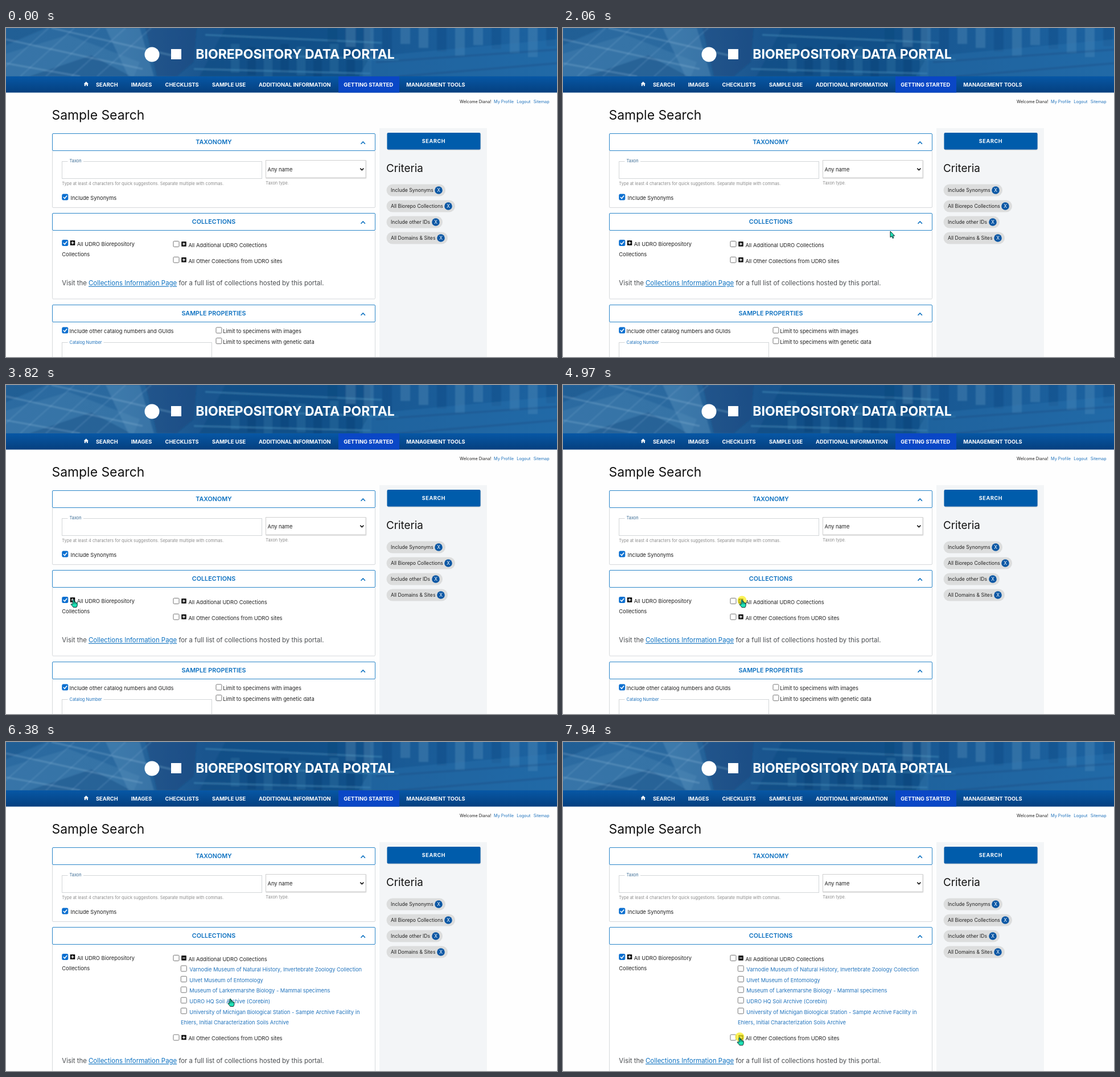
These frames come from a looping animation (968x578 px, 8000 ms). An HTML page:

```html
<!DOCTYPE html>
<html lang="en">
<head>
<meta charset="utf-8">
<title>Sample Search</title>
<style>
  html, body { margin: 0; width: 100%; height: 100%; overflow: hidden; background: #fefefe; }
  svg { display: block; width: 968px; height: 578px; font-family: Inter, "Open Sans", sans-serif; }
</style>
</head>
<body>
<svg id="stage" viewBox="0 0 968 578">
  <defs>
    <linearGradient id="photo">
      <stop offset="0" stop-color="#2c6ba1"/>
      <stop offset=".2" stop-color="#2a699f"/>
      <stop offset=".36" stop-color="#1a558e"/>
      <stop offset=".6" stop-color="#185791"/>
      <stop offset="1" stop-color="#1c62a0"/>
    </linearGradient>
    <linearGradient id="bar" x2="0" y2="1">
      <stop offset="0" stop-color="#0757a5"/>
      <stop offset="1" stop-color="#05407f"/>
    </linearGradient>
    <filter id="soft" x="-5%" y="-20%" width="110%" height="140%"><feGaussianBlur stdDeviation="1.1"/></filter>
    <filter id="drop" x="-10%" y="-20%" width="120%" height="160%">
      <feDropShadow dx=".4" dy=".8" stdDeviation=".7" flood-opacity=".25"/>
    </filter>
    <clipPath id="top"><rect width="968" height="85"/></clipPath>
  </defs>
</svg>
<script>
const NS = 'http://www.w3.org/2000/svg';
const stage = document.getElementById('stage');
const BLUE = '#0b70c0', LINK = '#2274bd', INK = '#222', GREY = '#d6d9dc';

function add(parent, tag, attrs = {}, content) {
  const el = document.createElementNS(NS, tag);
  for (const k in attrs) el.setAttribute(k, attrs[k]);
  if (content) el.textContent = content;
  parent.appendChild(el);
  return el;
}
const group = (parent = stage, attrs) => add(parent, 'g', attrs);
const text = (p, x, y, s, size = 9.3, fill = INK, more = {}) =>
  add(p, 'text', { x, y, 'font-size': size, fill, ...more }, s);
const rect = (p, x, y, width, height, fill, more = {}) =>
  add(p, 'rect', { x, y, width, height, fill, ...more });
const line = (p, d, stroke, width = 1, more = {}) =>
  add(p, 'path', { d, stroke, 'stroke-width': width, fill: 'none', ...more });
const shape = (p, d, fill, opacity = 1) => add(p, 'path', { d, fill, opacity });

function checkbox(p, cx, cy, on) {
  rect(p, cx - 5, cy - 5, 10, 10, on ? '#0b6fd0' : '#fff',
    { rx: 1.5, stroke: on ? '#0b6fd0' : '#767676' });
  if (on) line(p, `M${cx - 3} ${cy}l2.3 2.5 4-5`, '#fff', 1.6);
}
function plus(p, cx, cy) {
  rect(p, cx - 4.25, cy - 4.25, 8.5, 8.5, '#000', { rx: .6 });
  line(p, `M${cx - 2.6} ${cy}h5.2`, '#fff', 1.4);
  return line(p, `M${cx} ${cy - 2.6}v5.2`, '#fff', 1.4);
}
function heading(p, y, label) {
  const box = rect(p, 81.5, y + .5, 567, 30, '#fff', { rx: 1.5, stroke: '#2b86c9' });
  text(p, 365, y + 19.4, label, 10.75, BLUE, { 'font-weight': 600, 'text-anchor': 'middle' });
  line(p, `M623.5 ${y + 18.7}l3.7-3.7 3.7 3.7`, BLUE, 1.6);
  return box;
}
const card = (p, y, h) => rect(p, 81.5, y + .5, 567, h, '#fff', { rx: 1.5, stroke: GREY });

function banner() {
  const g = group(stage, { 'clip-path': 'url(#top)' });
  rect(g, 0, 0, 968, 85, 'url(#photo)');
  const s = group(g, { filter: 'url(#soft)' });
  shape(s, 'M0 0H70L0 30Z', '#1b538a', .5);
  shape(s, 'M0 45L110 12L235 60L225 85H0Z', '#5590bd', .25);
  shape(s, 'M40 85L150 48L220 85Z', '#1a5289', .5);
  shape(s, 'M175 0H235L260 85H215Z', '#6aa0c8', .3);
  shape(s, 'M245 0H335L330 60L300 85H265Z', '#123f72', .35);
  for (let i = 0; i < 5; i++)
    line(s, `M${i * 45 - 20} 85L${i * 45 + 75} 0`, '#8fbbda', 2, { opacity: .2 });
  line(s, 'M0 20L240 72M0 62L130 85M80 0L300 50', '#9cc4df', 3, { opacity: .25 });
  shape(s, 'M385 0H640V85H340Z', '#0f4278', .3);
  for (let i = 0; i < 9; i++)
    rect(s, 395 + i * 29, 28 + i % 3 * 5, 15, 50, i % 2 ? '#0b3567' : '#3d82b4', { opacity: .25 });
  line(s, 'M350 12L660 26M340 44L690 56M330 72L640 80', '#57a3cc', 3, { opacity: .35 });
  for (let i = 0; i < 13; i++)
    rect(s, 565 + i * 32, -4, 17, 30 + i * 7 % 26, i % 3 ? '#7fb0d2' : '#0d3c70', { opacity: .22 });
  shape(s, 'M640 50L968 20V85H620Z', '#2f7cb5', .3);
  line(s, 'M650 60L968 38M690 85L968 62', '#0f4278', 4, { opacity: .25 });

  add(g, 'circle', { cx: 256.5, cy: 46.5, r: 13, fill: '#fff' });
  rect(g, 290, 37, 18, 18, '#fff');
  text(g, 333.3, 53.8, 'BIOREPOSITORY DATA PORTAL', 23, '#fff', { 'font-weight': 700 });
}

function nav() {
  rect(stage, 0, 85, 968, 28.5, 'url(#bar)');
  rect(stage, 584, 85, 107, 28.5, '#0a47c6');
  shape(stage, 'M140.8 94.3L145 98.3H143.8V102H141.8V99.5H139.8V102H137.8V98.3H136.6Z', '#fff');
  const items = [[158, 'SEARCH'], [219.7, 'IMAGES'], [279.5, 'CHECKLISTS'], [362, 'SAMPLE USE'],
    [444, 'ADDITIONAL INFORMATION'], [593.3, 'GETTING STARTED'], [703.3, 'MANAGEMENT TOOLS']];
  for (const [x, s] of items) text(stage, x, 103, s, 9.3, '#fff', { 'font-weight': 700 });
  text(stage, 797, 132.2, 'Welcome Diana!', 7.25);
  for (const [x, s] of [[857, 'My Profile'], [897.3, 'Logout'], [926.7, 'Sitemap']])
    text(stage, x, 132.2, s, 7.3, LINK);
}

function sidebar() {
  rect(stage, 656, 176, 189, 402, '#f3f5f7');
  rect(stage, 669.5, 184, 164, 29.5, '#005cab', { rx: 2, filter: 'url(#drop)' });
  text(stage, 751.5, 202.2, 'SEARCH', 9, '#fff',
    { 'font-weight': 700, 'letter-spacing': .7, 'text-anchor': 'middle' });
  text(stage, 668, 253, 'Criteria', 18.8, '#111');
  const chips = [[772, 'Include Synonyms'], [789, 'All Biorepo Collections'],
    [767, 'Include other IDs'], [776, 'All Domains & Sites']];
  chips.forEach(([end, s], i) => {
    const y = 285 + i * 28;
    rect(stage, 668.5, y - 10.5, end - 668.5, 21, '#dcdddd', { rx: 10.5 });
    text(stage, 676, y + 3.3, s, 8.65);
    add(stage, 'circle', { cx: end - 12, cy: y, r: 6.8, fill: '#0b57a4' });
    text(stage, end - 12, y + 3.1, 'X', 8.4, '#fff', { 'text-anchor': 'middle' });
  });
}

function taxonomy() {
  text(stage, 80.5, 161.3, 'Sample Search', 22.9, '#111');
  card(stage, 215, 100);
  heading(stage, 185, 'TAXONOMY');
  rect(stage, 98.5, 234.5, 351, 30, '#fff', { stroke: '#d3d6d8' });
  rect(stage, 108.5, 232, 27.5, 5, '#fff');
  text(stage, 111.5, 236, 'Taxon', 7.4, '#3a6b94');
  text(stage, 98.3, 276.4, 'Type at least 4 characters for quick suggestions. Separate multiple with commas.', 7.4, '#8c8c8c');
  rect(stage, 456.5, 232.5, 175.5, 30.5, '#fff', { stroke: '#cfcfcf', filter: 'url(#drop)' });
  text(stage, 459.5, 251.8, 'Any name', 9.3);
  line(stage, 'M622.3 246.6l3 3 3-3', '#111', 1.6);
  text(stage, 456.3, 275, 'Taxon type.', 7.35, '#8c8c8c');
  checkbox(stage, 103.8, 297, true);
  text(stage, 113.6, 302.2, 'Include Synonyms');
}

banner();
nav();
sidebar();
taxonomy();

const body = card(stage, 355, 120.5);
const bar = heading(stage, 325, 'COLLECTIONS');
checkbox(stage, 103.8, 377.5, true);
plus(stage, 117, 377.5);
text(stage, 124.7, 382.8, 'All UDRO Biorepository');
text(stage, 98.3, 401.4, 'Collections');
checkbox(stage, 299, 379.5);
const upright = plus(stage, 312.5, 379.5);
text(stage, 320.4, 384.6, 'All Additional UDRO Collections');

const list = group();
['Varnodie Museum of Natural History, Invertebrate Zoology Collection',
 'Ulvet Museum of Entomology',
 'Museum of Larkenmarshe Biology - Mammal specimens',
 'UDRO HQ Soil Archive (Corebin)',
 'University of Michigan Biological Station - Sample Archive Facility in'
].forEach((s, i) => {
  checkbox(list, 312.3, 398 + i * 18.6);
  text(list, 322.3, 403.2 + i * 18.6, s, 9.3, LINK);
});
text(list, 307, 496.3, 'Ehlers, Initial Characterization Soils Archive', 9.3, LINK);

const lower = group();
checkbox(lower, 299, 407.3);
plus(lower, 312.5, 407.3);
text(lower, 320.4, 412.6, 'All Other Collections from UDRO sites');
const visit = text(lower, 98.3, 452.4, '', 11.42, '#4a4d50');
add(visit, 'tspan', {}, 'Visit the ');
add(visit, 'tspan', { fill: BLUE, 'text-decoration': 'underline' }, 'Collections Information Page');
add(visit, 'tspan', {}, ' for a full list of collections hosted by this portal.');
card(lower, 516, 120);
heading(lower, 486, 'SAMPLE PROPERTIES');
checkbox(lower, 103.8, 531, true);
text(lower, 111.6, 536, 'Include other catalog numbers and GUIds');
checkbox(lower, 374, 531);
text(lower, 381.3, 536, 'Limit to specimens with images');
checkbox(lower, 374, 549.7);
text(lower, 381.3, 554.8, 'Limit to specimens with genetic data');
rect(lower, 98.5, 552.5, 263, 40, '#fff', { stroke: '#d3d6d8' });
rect(lower, 108.5, 550, 63, 5, '#fff');
text(lower, 111.5, 555, 'Catalog Number', 7.4, LINK);

// Pointer art has its hotspot at 0,0
const glow = add(stage, 'circle', { r: 8, fill: '#f9ee20', opacity: .75 });
const pointer = group();
const ink = { stroke: '#0b2b2b', 'stroke-width': 1, 'stroke-linejoin': 'round', fill: '#1fe3b6' };
const arrow = add(pointer, 'path', { d: 'M0 0V10.8L2.4 8.7L4.2 12.5L6 11.7L4.3 8.1H7.6Z', ...ink });
const hand = group(pointer);
add(hand, 'path', { d: 'M-1.3 8.6V1.2Q-.2-.5 1 1.2V5.3Q2-.1 3.2 5.5Q4.4 4.5 5 5.9Q6.6 5.3 6.7 7.2V10.4Q6.4 12.2 5.3 13.8H-.3Q-1.4 12-4.2 9Q-4.6 6.6-1.3 8.6Z', ...ink });
line(hand, 'M1 5.5V8M3.2 5.8V8M5 6.2V8', '#0b2b2b', .6);

// time, x, y, hand shown
const path = [
  [670, 548, 571, 0], [900, 538, 500, 0], [1200, 527, 418, 0], [1440, 522, 391, 0],
  [1750, 522, 391, 0], [2060, 575, 357, 0], [2130, 592, 350, 1], [2210, 604, 344, 1],
  [2370, 460, 338, 1], [2530, 314, 338, 1], [2750, 314, 338, 1], [2950, 250, 353, 1],
  [3000, 230, 357, 0], [3280, 130, 378, 1], [3360, 119, 380, 1], [3450, 117, 382, 1],
  [3820, 116.5, 376.5, 1], [3980, 138, 379, 0], [4280, 234, 384, 0], [4590, 296, 380, 0],
  [4670, 306, 378, 1], [4820, 314.5, 377, 1], [5690, 314.5, 377, 1], [5920, 330, 395, 1],
  [6380, 394, 450.5, 1], [6460, 399, 457, 1], [6530, 397, 459, 1], [6900, 350, 492, 1],
  [7000, 338, 500, 0], [7200, 316, 518, 1], [7310, 310.5, 522, 1], [7390, 310.5, 520.5, 1],
  [7690, 310.5, 519, 1]
];
const starts = [670, 1750, 2590, 3450, 4280, 5690, 6530, 7390];
const STEP = 77;

// The pointer advances in steps; the slack absorbs their uneven lengths
function pose(t) {
  const from = starts.filter(s => s <= t).pop();
  const q = from + Math.floor((t - from) / STEP + .25) * STEP;
  let i = path.length - 1;
  while (i > 0 && path[i][0] > q + 3) i--;
  const a = path[i], b = path[i + 1] || a;
  const k = b === a ? 0 : Math.max(0, (q - a[0]) / (b[0] - a[0]));
  return { x: a[1] + (b[1] - a[1]) * k, y: a[2] + (b[2] - a[2]) * k, isHand: a[3] };
}
const show = (el, on) => el.setAttribute('visibility', on ? 'inherit' : 'hidden');

function draw(t) {
  const open = t >= 5060;
  lower.setAttribute('transform', `translate(0 ${open ? 111.8 : 0})`);
  body.setAttribute('height', open ? 232.3 : 120.5);
  show(list, open);
  show(upright, !open);

  const seen = t >= 670;
  pointer.setAttribute('visibility', seen ? 'visible' : 'hidden');
  let hover = false;
  if (seen) {
    const p = pose(t);
    pointer.setAttribute('transform', `translate(${p.x} ${p.y})`);
    show(hand, p.isHand);
    show(arrow, !p.isHand);
    hover = p.y > 325 && p.y < 356;
    glow.setAttribute('cx', p.x);
    glow.setAttribute('cy', p.y + (open ? -.8 : 1.5));
  }
  bar.setAttribute('fill', hover ? '#e6e6e6' : '#fff');
  show(glow, (t >= 4970 && t < 5060) || t >= 7940);
}

const t0 = performance.now();
function tick() {
  draw((performance.now() - t0) % 8000);
  requestAnimationFrame(tick);
}
tick();
</script>
</body>
</html>
```
